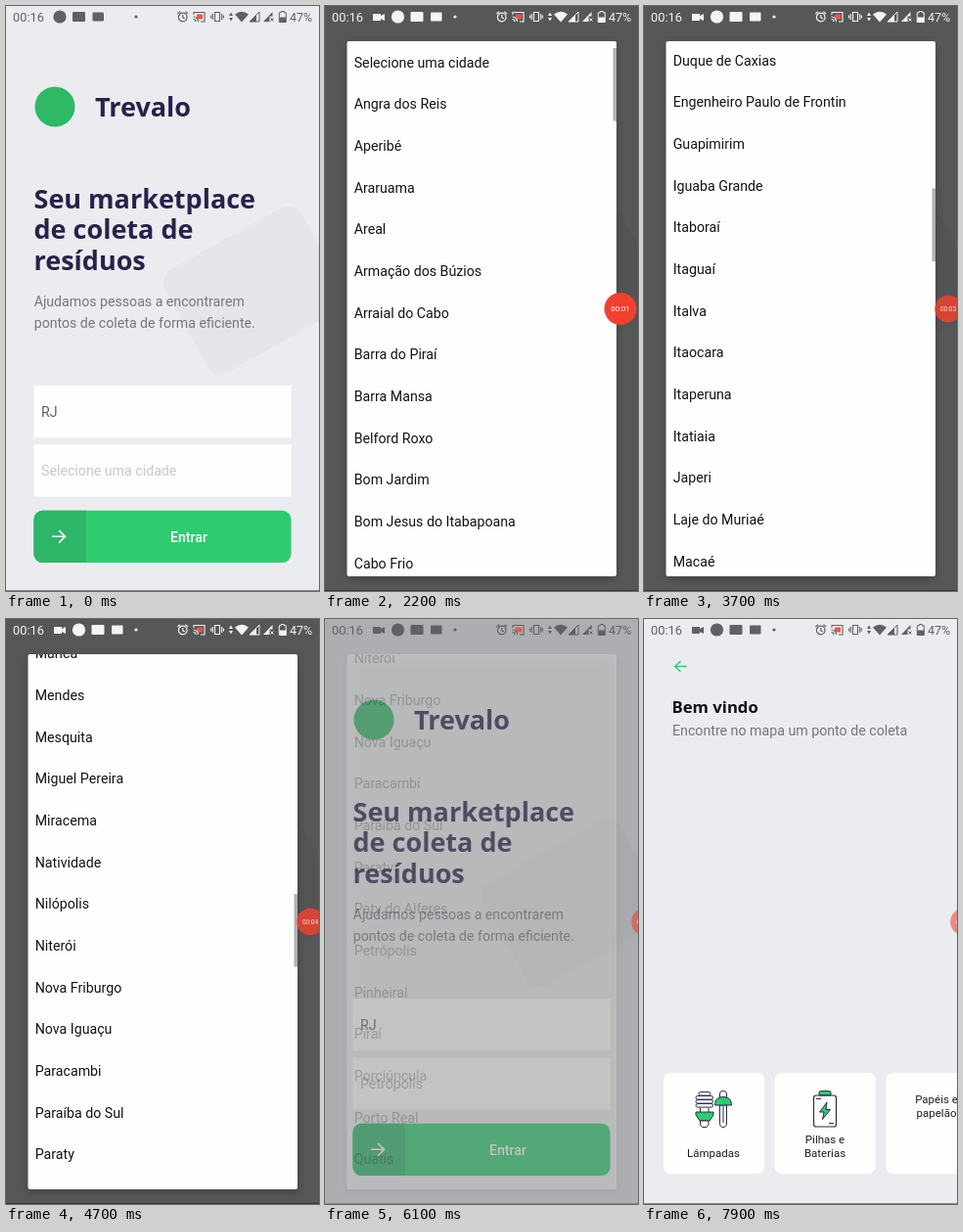
An HTML page with a canvas for the animation above (8000 ms loop, 320 by 598 pixels).

```html
<!DOCTYPE html>
<html lang="pt-BR">
<head>
<meta charset="utf-8">
<title>Trevalo</title>
<style>
html, body { margin: 0; width: 100%; height: 100%; overflow: hidden; background: #ebecf0; }
canvas { display: block; width: 320px; height: 598px; }
</style>
</head>
<body>
<canvas id="stage"></canvas>
<script>
const W = 320, H = 598, LOOP = 8000, STEP = 100;
const canvas = document.getElementById('stage');
const ctx = canvas.getContext('2d');
const dpr = window.devicePixelRatio || 1;
canvas.width = W * dpr;
canvas.height = H * dpr;

const BODY = 'Roboto, "Liberation Sans", sans-serif';
const HEAD = '"Noto Sans", "Open Sans", sans-serif';
const BG = '#ebecf0', GREEN = '#2fcb71', INK = '#2b2b4c', TITLE = '#2a214b';
const ROW = 42.67;

const cities = ('Selecione uma cidade,Angra dos Reis,Aperibé,Araruama,Areal,Armação dos Búzios,' +
  'Arraial do Cabo,Barra do Piraí,Barra Mansa,Belford Roxo,Bom Jardim,Bom Jesus do Itabapoana,' +
  'Cabo Frio,Cachoeiras de Macacu,Cambuci,Campos dos Goytacazes,Cantagalo,Carapebus,' +
  'Cardoso Moreira,Carmo,Casimiro de Abreu,Comendador Levy Gasparian,Conceição de Macabu,' +
  'Cordeiro,Duas Barras,Duque de Caxias,Engenheiro Paulo de Frontin,Guapimirim,Iguaba Grande,' +
  'Itaboraí,Itaguaí,Italva,Itaocara,Itaperuna,Itatiaia,Japeri,Laje do Muriaé,Macaé,Macuco,' +
  'Magé,Mangaratiba,Maricá,Mendes,Mesquita,Miguel Pereira,Miracema,Natividade,Nilópolis,' +
  'Niterói,Nova Friburgo,Nova Iguaçu,Paracambi,Paraíba do Sul,Paraty,Paty do Alferes,' +
  'Petrópolis,Pinheiral,Piraí,Porciúncula,Porto Real,Quatis,Queimados,Quissamã,Resende').split(',');

// Each fling: start, duration, distance
const flings = [[2400, 1400, 1069.1], [3850, 1000, 704.9], [4850, 750, 291.4]];

const clamp = x => Math.max(0, Math.min(1, x));
const ramp = (t, from, to) => clamp((t - from) / (to - from));
const easeOut = p => 1 - (1 - p) ** 3;
const mix = (a, b, p) => a + (b - a) * p;

function text(str, x, y, size, color, { font = BODY, weight = 400, align = 'left' } = {}) {
  ctx.font = `${weight} ${size}px ${font}`;
  ctx.textAlign = align;
  ctx.fillStyle = color;
  ctx.fillText(str, x, y);
}

function box(x, y, w, h, color, r = 0) {
  ctx.fillStyle = color;
  ctx.beginPath();
  ctx.roundRect(x, y, w, h, r);
  ctx.fill();
}

function disc(x, y, r, color) {
  ctx.fillStyle = color;
  ctx.beginPath();
  ctx.arc(x, y, r, 0, Math.PI * 2);
  ctx.fill();
}

// SVG path, filled and/or stroked
function path(d, fill, stroke, width = 1) {
  const p = new Path2D(d);
  if (fill) { ctx.fillStyle = fill; ctx.fill(p); }
  if (stroke) { ctx.strokeStyle = stroke; ctx.lineWidth = width; ctx.stroke(p); }
}

function layer(alpha, draw) {
  ctx.save();
  ctx.globalAlpha *= alpha;
  draw();
  ctx.restore();
}

function drawStatus(t, color) {
  const shift = t < 300 ? 0 : 19.5;
  text('00:16', 7, 15.7, 12.8, color);
  if (shift) path('M49 8h8v2l4-2v7l-4-2v2h-8z', color);
  disc(55 + shift, 11, 6.6, color);
  box(68 + shift, 6, 13, 10, color, 1);
  box(88.5 + shift, 6.5, 11.5, 9, color, 1);
  disc(133, 11, 1.6, color);

  // alarm
  path('M185 11.5a4.3 4.3 0 1 1 -8.6 0a4.3 4.3 0 1 1 8.6 0M180.8 9v2.8l2 1.2M175.4 8l2.6-2.3M186 8l-2.6-2.3', null, color, 1.2);
  // cast
  path('M192 9v-2.5h11v9.5h-4', null, color, 1.1);
  box(195, 8.5, 6, 5, '#ee5544');
  path('M191.5 11a5 5 0 0 1 5 5M191.5 13.5a2.5 2.5 0 0 1 2.5 2.5', null, color, 1.1);
  // vibrate
  path('M213.5 6.5h5v9h-5zM211.3 8v6M220.7 8v6M209.6 9.5v3M222.4 9.5v3', null, color, 1.1);
  // data arrows, wifi, signal
  path('M228 10l2-3.5 2 3.5zM228 12l2 3.5 2-3.5z', color);
  path('M234 8.5q7-5.5 14 0l-7 8z', color);
  path('M249 16l10-10v10z', null, color, 1);
  path('M249 16l7-7v7z', color);
  path('M263 16l9.5-10v4.5h-3v5.5z', color);
  path('M270.5 12.5l3 3M273.5 12.5l-3 3', null, color, 1);
  // battery
  path('M281.3 5.5h3v1.3h2v9.7h-7v-9.7h2z', null, color, 1);
  box(279.5, 11.5, 6.6, 5, color);
  text('47%', 290, 15.7, 12.5, color);
}

function drawHome(t) {
  box(0, 0, W, H, BG);
  ctx.save();
  ctx.translate(155, 277);
  ctx.rotate(-0.51);
  box(0, 0, 160, 120, '#e5e6ea', 16);
  ctx.restore();

  disc(50, 103, 20.5, '#2fb866');
  const title = { font: HEAD, weight: 700 };
  text('Trevalo', 91, 113, 27, TITLE, title);
  ['Seu marketplace', 'de coleta de', 'resíduos'].forEach((s, i) =>
    text(s, 28.5, 206.7 + i * 31.6, 27, TITLE, title));
  text('Ajudamos pessoas a encontrarem', 28.7, 307.3, 14.15, '#77767f');
  text('pontos de coleta de forma eficiente.', 28.7, 328.5, 14.15, '#77767f');

  box(28.4, 388, 263.2, 53.3, '#fefefe');
  box(28.4, 448.3, 263.2, 53.3, '#fefefe');
  text('RJ', 36, 420, 14.2, '#5f5f5f');
  if (t < 6000) text('Selecione uma cidade', 36, 480, 14.2, '#c8c8c8');
  else text('Petrópolis', 36, 480, 14.2, t < 6200 ? '#b4b4b4' : '#686868');

  ctx.save();
  ctx.beginPath();
  ctx.roundRect(28.4, 515.8, 263.2, 53.3, 9);
  ctx.clip();
  box(28, 515, 265, 55, GREEN);
  box(28, 515, 53.8, 55, '#2db568');
  if (t >= 7200) {
    const r = mix(80, 190, ramp(t, 7200, 7400));
    layer(1 - ramp(t, 7300, 7600), () => disc(205, 545, r, 'rgba(25,110,60,.22)'));
  }
  ctx.restore();
  path('M47 542.3h13M54.2 536l6.3 6.3l-6.3 6.3', null, '#fff', 1.6);
  text('Entrar', 187, 547.5, 14.2, '#f6fff9', { weight: 500, align: 'center' });
}

function drawBulbs() {
  // spiral lamp
  for (let i = 0; i < 4; i++) {
    ctx.beginPath();
    ctx.roundRect(i ? 53 : 56, 483.5 + i * 4, i ? 17.5 : 12, 3.6, 1.8);
    ctx.strokeStyle = INK;
    ctx.lineWidth = 1;
    ctx.stroke();
  }
  path('M57.5 500v4M66 500v4', null, INK);
  path('M53 504h18v3l-4 6h-10l-4-6z', GREEN, INK);
  path('M57.5 513h8.5v4l-2 2.5h-4.5l-2-2.5z', '#fff', INK);
  // tube lamp
  path('M77.5 490v-5q0-2.5 3.5-2.5t3.5 2.5v5z', '#fff', INK);
  path('M77.5 497v18q0 4.5 3.5 4.5t3.5-4.5v-18zM81 498v17', '#fff', INK);
  path('M72.5 497q0-8.5 8.5-8.5t8.5 8.5z', GREEN, INK);
}

function drawBattery() {
  path('M179 487v-3q0-1.5 1.5-1.5h9q1.5 0 1.5 1.5v3z', GREEN, INK);
  ctx.beginPath();
  ctx.roundRect(173.5, 487, 23, 32, 2.5);
  ctx.strokeStyle = INK;
  ctx.lineWidth = 1.2;
  ctx.stroke();
  path('M187 494l-7.5 10h4.5l-1.5 7.5l8-10h-4.5z', GREEN, INK);
  path('M176 490.5h5M189 515.5h5', null, INK);
}

function drawPoints(t) {
  box(0, 0, W, H, BG);
  path('M44 48.5h-12M37.5 43l-5.7 5.5l5.7 5.5', null, '#34cb79', 1.5);
  text('Bem vindo', 28.5, 96, 16.7, '#111', { font: HEAD, weight: 700 });
  text('Encontre no mapa um ponto de coleta', 29, 119.3, 14.2, '#74747f');
  if (t < 7800) return;
  for (let i = 0; i < 3; i++) box(20 + i * 113.7, 464, 103, 103, '#fefefe', 7);
  const label = (s, x, y) => text(s, x, y, 11.5, '#1d1d1d', { align: 'center' });
  label('Lâmpadas', 71, 550);
  label('Pilhas e', 185, 536);
  label('Baterias', 185, 550);
  label('Papéis e', 299, 494.5);
  label('papelão', 299, 508.5);
  if (t >= 7900) {
    drawBulbs();
    drawBattery();
  }
}

function drawDialog(scroll) {
  ctx.save();
  ctx.shadowColor = 'rgba(0,0,0,.25)';
  ctx.shadowBlur = 8 * dpr;
  ctx.shadowOffsetY = 3 * dpr;
  box(22.5, 36, 275.5, 547, '#fdfefd', 2);
  ctx.restore();
  ctx.save();
  ctx.beginPath();
  ctx.rect(22.5, 36, 275.5, 547);
  ctx.clip();
  cities.forEach((name, i) => {
    const y = 62.5 + i * ROW - scroll;
    if (y > 25 && y < 600) text(name, 29.7, y, 14.2, '#141414');
  });
  box(294.5, 43 + scroll * 0.1343, 3.5, 74.5, '#b1b2b1');
  ctx.restore();
}

function drawBubble(t) {
  const shrink = ramp(t, 2700, 3000);
  const leave = ramp(t, 5300, 5700);
  let x = mix(337, 302, easeOut(ramp(t, 0, 500)));
  x = mix(x, 311, shrink);
  x = mix(x, 327, leave);
  const r = mix(16.5, 13.8, shrink);
  const alpha = mix(mix(1, 0.84, shrink), 0.58, leave);
  const sec = Math.max(0, Math.floor((t - 300) / 1000));
  layer(alpha, () => disc(x, 309.5, r, '#f04130'));
  layer(mix(1, 0.8, shrink), () =>
    text('00:0' + sec, x, 312.2, mix(7.8, 6.5, shrink), '#fff', { align: 'center' }));
}

function draw(t) {
  ctx.setTransform(dpr, 0, 0, dpr, 0, 0);
  ctx.globalAlpha = 1;
  drawHome(t);

  const enter = ramp(t, 7300, 7700);
  if (enter > 0) layer(enter, () => {
    ctx.translate(0, 48 * (1 - easeOut(enter)));
    drawPoints(t);
  });

  const shown = ramp(t, 1700, 2100) * (1 - ramp(t, 5925, 6225));
  if (shown > 0) {
    const scroll = flings.reduce((sum, [t0, dur, dist]) =>
      sum + dist * easeOut(ramp(t, t0, t0 + dur)), 0);
    box(0, 0, W, H, `rgba(0,0,0,${0.63 * shown})`);
    // the panel fades faster than the dim behind it
    layer(shown ** 1.7, () => drawDialog(scroll));
  }
  drawStatus(t, shown > 0.6 ? '#f4f4f4' : '#606163');
  box(0, 597, W, 1, shown > 0.6 ? '#3a3a3a' : '#85868a');
  if (t > 0) drawBubble(t);
}

const start = performance.now();
function tick() {
  const t = (performance.now() - start) % LOOP;
  draw(Math.floor(t / STEP) * STEP);
  requestAnimationFrame(tick);
}
tick();
</script>
</body>
</html>
```
